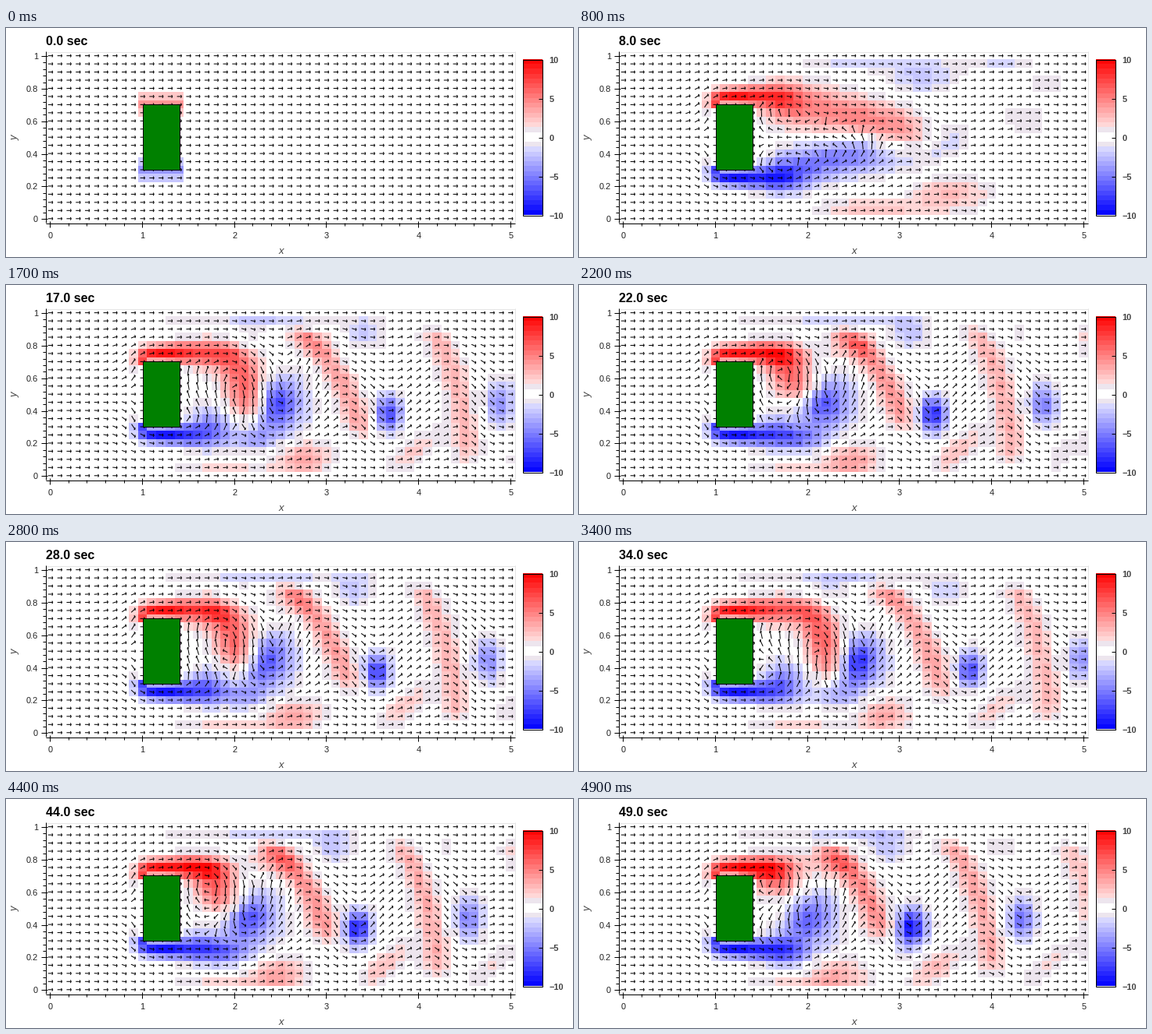
These frames come from a looping animation (725 by 294 pixels, 5 s). A matplotlib script:

```python
import numpy as np
import matplotlib.pyplot as plt
from matplotlib.animation import FuncAnimation
from matplotlib.collections import LineCollection
from matplotlib.colors import ListedColormap
from matplotlib.patches import Rectangle

W, H, DPI = 725, 294, 100
PT = 72 / DPI
NX, NY, DX, DY = 51, 21, 0.1, 0.05
LEFT, RIGHT, TOP, BOTTOM = 51, 651, 30.4, 250
INFLOW = 0.48          # mean speed of the channel
WAVE = 1.22            # spacing of the shed vortices
DRIFT = 0.4455         # how far they travel per second
ARROW = 0.05

x, y = np.meshgrid(np.arange(NX) * DX, np.arange(NY) * DY)
solid = np.zeros((NY, NX), bool)
solid[6:15, 10:15] = True


def px(v):
    return LEFT + (np.asarray(v) + 0.05) * (RIGHT - LEFT) / 5.1


def py(v):
    return BOTTOM - (np.asarray(v) + 0.025) * (BOTTOM - TOP) / 1.05


def sig(v):
    return 1 / (1 + np.exp(-np.clip(v, -50, 50)))


def blob(cx, cy, sx, sy, amp):
    return amp * np.exp(-((x - cx) / sx) ** 2 - ((y - cy) / sy) ** 2)


def smooth(v):
    v = np.clip(v, 0, 1)
    return v * v * (3 - 2 * v)


# ---- vorticity ---------------------------------------------------------

def shear_layer(yy):
    """Layer leaving the upper corner of the block."""
    amp = 9 * sig((x - 1.0) / 0.04) * np.exp(-np.maximum(0, x - 1.3) / 1.1)
    width = 0.05 + 0.03 * np.clip((x - 1.2) / 0.5, 0, 1)
    layer = amp * sig((1.9 - x) / 0.1) * np.exp(-((yy - 0.75) / width) ** 2)
    corner = 5 * np.exp(-((x - 1) / 0.05) ** 2 - ((yy - 0.7) / 0.04) ** 2)
    front = 2 * np.exp(-((x - 0.92) / 0.07) ** 2 - ((yy - 0.7) / 0.07) ** 2)
    return layer + corner + front


LAYERS = shear_layer(y) - shear_layer(1 - y)


def starting_wake(t):
    """Long, nearly symmetric wake that grows before shedding sets in."""
    age = min(t / 8, 1.3)
    front = 1.4 + 0.23 * t
    behind = sig((x - 1.6) / 0.08)
    s = np.clip((x - 1.6) / 1.6, 0, 1.2)
    red_mid = 0.69 - 0.17 * age * s ** 1.7
    red = 5 * np.exp(-((y - red_mid) / 0.13) ** 2) * sig((front - x) / 0.1) * behind
    blue_mid = (0.29 + 0.1 * age * smooth((x - 1.6) / 1)
                + 0.12 * smooth((x - front) / 0.5))
    strength = 2 + 3.3 * sig((front - 0.5 - x) / 0.08)
    blue = (strength * np.exp(-((y - blue_mid) / 0.12) ** 2)
            * sig((front + 0.5 - x) / 0.1) * behind)
    walls = (blob(front, 0.87, 0.4, 0.1, -2.2 * age)
             + blob(front - 0.7, 0.95, 0.6, 0.04, -1.6 * age)
             + blob(front + 0.9, 0.95, 0.5, 0.05, -1.4 * age)
             + blob(front + 0.3, 0.16, 0.4, 0.1, 2.8 * age)
             + blob(front - 0.5, 0.06, 0.6, 0.06, 2.4 * age))
    faint = (blob(front + 1.1, 0.6, 0.35, 0.14, 0.9 * age)
             + blob(front + 1.35, 0.85, 0.25, 0.1, 0.9 * age))
    return red - blue + walls + faint


def shed_pair(c):
    """One blue core and the red streak behind it; c is the phase position."""
    born = sig((c - 1.7) / 0.1)
    old = sig((c - 2.75) / 0.2)
    aged = sig((c - 4) / 0.2)
    young = born * (1 - old)
    u = c - 1.7
    p = 1.6 + 0.5 * (u + np.hypot(u, 0.6)) + 0.1 * old

    # blue core, wide and leaning at first, then compact
    amp = 6.2 * sig((c - 1.2) / 0.25) + 3.5 * sig((c - 2.4) / 0.1)
    amp *= np.exp(-max(0, c - 3.1) / 1.8)
    mid_y = 0.33 + 0.11 * sig((c - 1.5) / 0.15) - 0.07 * old + 0.07 * aged
    tall = 0.1 + 0.06 * young + 0.02 * aged
    q = blob(p + 0.3 * young * (y - mid_y), mid_y,
             0.22 - 0.08 * old, tall, -amp)
    q += blob(p + 0.25, 0.42, 0.22, 0.2, -2 * young)
    q += blob(p - 0.2, 0.22, 0.28, 0.07, -3.5 * young)
    q += blob(p, 0.45, 0.27, 0.22, -0.9 * aged)

    # red streak, sloping down towards the core
    s = np.clip((y - 0.25) / 0.6, 0, 1.1)
    slope = 0.5 + 0.5 * old - 0.5 * aged
    mid = p - 0.18 - 0.1 * old - 0.07 * aged - (0.35 * s + 0.3 * s ** 3) * slope
    low = 0.33 + 0.3 * sig((2.1 - c) / 0.15) - 0.23 * sig((c - 3.8) / 0.2)
    high = 0.77 + 0.12 * old
    gate = sig((y - low) / 0.03) * sig((high - y) / 0.02)
    amp = 6 * born * min(1, np.exp(-(c - 2.5) / 2.2))
    width = 0.25 - 0.09 * old - 0.04 * aged
    q += gate * (amp * np.exp(-((x - mid) / width) ** 2)
                 + 0.9 * aged * np.exp(-((x - mid) / 0.3) ** 2))
    arch = old * np.exp(-max(0, c - 3.3) / 0.4)
    q += blob(p - 0.86, 0.77 + 0.1 * (c - 3.08), 0.28, 0.09, 3.2 * arch)

    # response along the channel walls
    patch = sig((c - 2.5) / 0.15) * np.exp(-max(0, c - 3.5) / 0.9)
    q += blob(p - 0.25, 0.87, 0.22, 0.1, -2.4 * patch)
    foot = p + 0.33 - 0.03 * old + 1.5 * old * (y - 0.17)
    q += blob(foot, 0.1 + 0.05 * old, 0.3 - 0.12 * old, 0.1 + 0.03 * old,
              3.8 * born * np.exp(-max(0, c - 2.4) / 2))
    return q


WALLS = (blob(2.45, 0.95, 0.7, 0.04, -1.9) + blob(1.5, 0.95, 0.3, 0.03, -0.8)
         + blob(1.9, 0.05, 0.55, 0.04, 1.5))


def vorticity(t):
    if t == 0:
        q = np.zeros_like(x)
        for row, level in ((13, 2.2), (14, 4.2), (15, 2.2)):
            q[row, 10:15] = level
            q[20 - row, 10:15] = -level
        return q
    shed = smooth((t - 7.5) / 5.5)
    q = LAYERS * (1 - np.exp(-t))
    if shed < 1:
        q = q + (1 - shed) * starting_wake(t)
    if shed > 0:
        settle = 0.17 * np.exp(-(t - 17) / 5)
        first = (3.48 + DRIFT * (t - 28) + settle) % WAVE
        wake = WALLS + sum(shed_pair(first + k * WAVE) for k in range(6))
        q = q + shed * wake
    q[0] = q[-1] = 0
    q[7:14, 10:15] = 0
    return np.clip(q, -9.99, 9.99)


# ---- flow direction from the stream function -----------------------------

def poisson_inverse():
    n = NX * NY
    a = np.eye(n)
    for j in range(1, NY - 1):
        for i in range(1, NX):
            k = j * NX + i
            if solid[j, i]:
                continue
            if i == NX - 1:
                a[k, k - 1] = -1
                continue
            a[k, k] = -2 / DX ** 2 - 2 / DY ** 2
            a[k, [k - 1, k + 1]] = 1 / DX ** 2
            a[k, [k - NX, k + NX]] = 1 / DY ** 2
    return np.linalg.inv(a)


INVERSE = poisson_inverse()


def flow_angle(t, q):
    if t == 0:
        return np.zeros_like(x)
    rhs = q.copy()
    rhs[:, -1] = 0
    rhs[:, 0] = INFLOW * y[:, 0]
    rhs[0], rhs[-1] = 0, INFLOW
    rhs[solid] = INFLOW / 2
    psi = (INVERSE @ rhs.ravel()).reshape(NY, NX)
    u = np.gradient(psi, DY, axis=0)
    v = -np.gradient(psi, DX, axis=1)
    u[solid] = v[solid] = 0
    v[:, 0] = v[0] = v[-1] = 0
    u[[0, -1]] = np.abs(u[[0, -1]])
    return np.arctan2(v, u)


def arrow_segments(angle):
    """Shaft and two barbs per grid point, equal length in data units."""
    a = angle.ravel()
    hx, hy = np.cos(a) * ARROW / 2, np.sin(a) * ARROW / 2
    tip_x, tip_y = x.ravel() + hx, y.ravel() + hy
    ends = [(x.ravel() - hx, y.ravel() - hy)]
    for turn in (np.pi / 4, -np.pi / 4):
        ends.append((tip_x - np.cos(a + turn) * ARROW / 4,
                     tip_y - np.sin(a + turn) * ARROW / 4))
    tip = np.column_stack([px(tip_x), py(tip_y)])
    return np.concatenate([
        np.stack([tip, np.column_stack([px(ex), py(ey)])], axis=1)
        for ex, ey in ends])


# ---- figure ----------------------------------------------------------------

def palette(n=32):
    colors = []
    for k in range(n):
        v = (k + 0.5) / n * 2 - 1
        pale = 1 - abs(v)
        if abs(v) < 2 / n:
            colors.append((1, 1, 1))
        elif abs(v) < 4 / n:
            colors.append((0.93, 0.9, 0.935))
        else:
            colors.append((1, pale, pale) if v > 0 else (pale, pale, 1))
    return ListedColormap(colors)


plt.rcParams["font.family"] = "Liberation Sans"
fig = plt.figure(figsize=(W / DPI, H / DPI), dpi=DPI, facecolor="white")
ax = fig.add_axes([0, 0, 1, 1])
ax.axis("off")
cmap = palette()

field = ax.imshow(np.zeros((NY, NX)), cmap=cmap, vmin=-10, vmax=10,
                  origin="lower", extent=(LEFT, RIGHT, BOTTOM, TOP),
                  interpolation="nearest", aspect="auto", zorder=1)
ax.imshow(np.linspace(10, -10, 32)[:, None], cmap=cmap, vmin=-10, vmax=10,
          extent=(661, 686, 240, 40), interpolation="nearest",
          aspect="auto", zorder=1)
ax.set_xlim(0, W)
ax.set_ylim(H, 0)

ROW = 0.6  # keeps horizontal lines clear of the rounding edge

arrows = LineCollection([], colors="black", linewidths=PT, zorder=3)
arrows.set_snap(False)
ax.add_collection(arrows)
ax.add_patch(Rectangle((px(1), py(0.7)), px(1.4) - px(1), py(0.3) - py(0.7),
                       fc="#008000", ec="black", lw=PT, zorder=4))
ax.add_patch(Rectangle((661.5, 40 + ROW), 25, 200, fc="none", ec="black",
                       lw=PT, zorder=4))


def line(xs, ys, color="black"):
    ax.plot(xs, ys, color=color, lw=PT, solid_capstyle="butt", zorder=5)


def label(tx, ty, text, size=11, ha="center", **kw):
    kw.setdefault("color", "#444444")
    return ax.text(tx, ty, text, fontsize=size * PT, ha=ha,
                   va=kw.pop("va", "center_baseline"), zorder=6, **kw)


line([LEFT, RIGHT], [30 + ROW] * 2, "#e5e5e5")
line([RIGHT + 0.5] * 2, [TOP, BOTTOM], "#e5e5e5")
line([LEFT + 0.5] * 2, [TOP, BOTTOM])
line([LEFT, RIGHT], [BOTTOM + ROW] * 2)

for k in range(26):
    tx = np.floor(px(k / 5)) + 0.5
    ty = np.floor(py(k / 25)) + ROW
    major = k % 5 == 0
    out, inner = (6, 2) if major else (4, 0)
    line([tx, tx], [BOTTOM - inner, BOTTOM + out])
    line([LEFT - out, LEFT + inner], [ty, ty])
    if major:
        label(tx, 265.5, str(k // 5), color="#222222")
        label(41, ty, f"{k / 25:g}", ha="right", color="#222222")

for value in (10, 5, 0, -5, -10):
    ty = 140 + ROW - 10 * value
    line([681, 686], [ty, ty])
    label(694.5, ty, str(value).replace("-", "\u2212"), ha="left", weight="bold")

label(351.5, 285, "x", 13, style="italic")
label(12, 140.5, "y", 13, style="italic", rotation=90, va="center")
title = label(51.5, 22, "", 16, ha="left", va="baseline",
              weight="bold", color="black")


def update(t):
    q = vorticity(t)
    field.set_data(q)
    arrows.set_segments(arrow_segments(flow_angle(t, q)))
    title.set_text(f"{t:.1f} sec")
    return field, arrows, title


anim = FuncAnimation(fig, update, frames=50, interval=100,
                     repeat=True, repeat_delay=0, blit=False)
plt.show()
```
